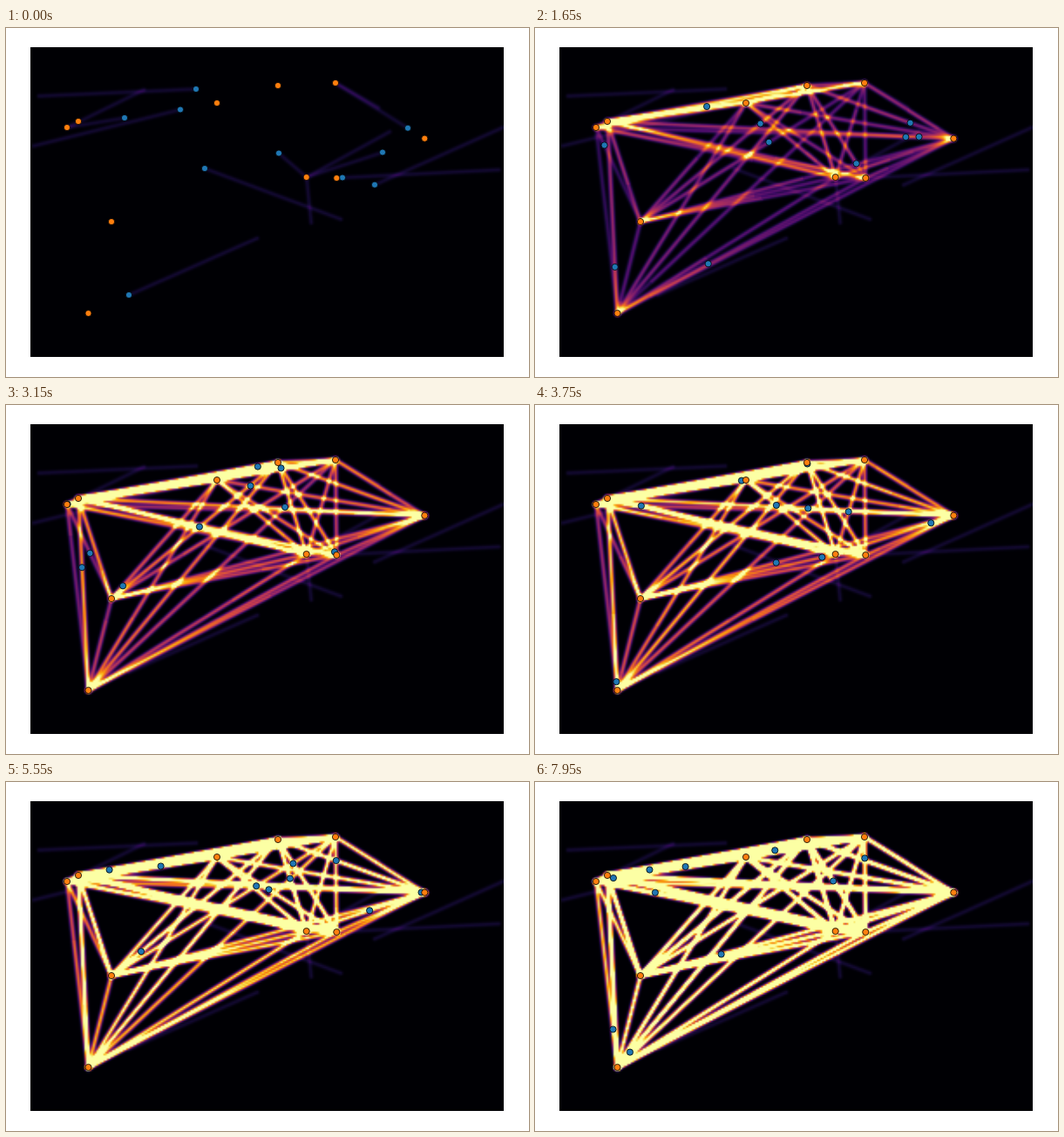
Recreate the animation shown at these times as an HTML page with a canvas. Size 600x400 px, loop 8000 ms.

```html
<!DOCTYPE html>
<html lang="en">
<head>
<meta charset="utf-8">
<title>Walkers between nodes</title>
<style>
  html, body { margin: 0; width: 100%; height: 100%; overflow: hidden; background: #fff; }
  canvas { display: block; }
</style>
</head>
<body>
<canvas id="stage" width="600" height="400"></canvas>
<script>
const STEP = 50, STEPS = 160, WALKERS = 10;
const BOX = { x: 28, y: 22, w: 543, h: 355 };
const COLS = 272, ROWS = 178;
const CW = BOX.w / COLS, CH = BOX.h / ROWS;
const SIGMA = 1.7, DEPOSIT = 0.085, RATE = 0.115;

// Each node has a place and a pull: how often walkers choose it
const nodes = [
  { at: [70, 114], pull: 0.75 }, { at: [83, 107], pull: 1.5 },
  { at: [242, 86], pull: 1.15 }, { at: [312, 66], pull: 1.35 },
  { at: [378, 63], pull: 1 }, { at: [480.3, 126.7], pull: 0.9 },
  { at: [344.7, 171], pull: 1 }, { at: [379.3, 172], pull: 0.9 },
  { at: [121, 222], pull: 0.9 }, { at: [94.5, 327], pull: 0.85 }
];

// First legs, from random places towards and past a node
const opening = [
  [[38, 78], [218, 70]], [[158, 71], nodes[0].at, [136, 103]], [[32, 135], [200, 93.5]],
  [[384, 219], [228, 161]], [[288, 241], [141, 306]], [[440, 119], nodes[6].at, [313, 143.5]],
  [[350, 223], nodes[6].at, [432, 142.5]], [[565, 162.5], [386, 171.5]],
  [[570, 114], [423, 179.7]], [[427, 91], nodes[4].at, [461, 114.7]]
];

const inferno = '000004 160b39 420a68 6a176e 932667 bc3754 dd513a f37819 fca50a f6d746 fcffa4'
  .split(' ').map(hex => [16, 8, 0].map(shift => parseInt(hex, 16) >> shift & 255));

const mix = (a, b, t) => a + (b - a) * t;
const rand = n => {
  n = Math.imul(n ^ (n >>> 15), 0x2c1b3c6d) + 0x9e3779b9 | 0;
  n = Math.imul(n ^ (n >>> 13), 0x297a2d39);
  return ((n ^ (n >>> 16)) >>> 0) / 4294967296;
};

// Cells near a segment: index, place along it and strength
function stroke([x1, y1], [x2, y2]) {
  const cells = [], pad = SIGMA * 3.5, dx = x2 - x1, dy = y2 - y1, len2 = dx * dx + dy * dy;
  const col = x => Math.floor((x - BOX.x) / CW), row = y => Math.floor((y - BOX.y) / CH);
  const c0 = Math.max(0, col(Math.min(x1, x2) - pad)), c1 = Math.min(COLS - 1, col(Math.max(x1, x2) + pad));
  const r0 = Math.max(0, row(Math.min(y1, y2) - pad)), r1 = Math.min(ROWS - 1, row(Math.max(y1, y2) + pad));
  for (let r = r0; r <= r1; r++) for (let c = c0; c <= c1; c++) {
    const px = BOX.x + (c + 0.5) * CW - x1, py = BOX.y + (r + 0.5) * CH - y1;
    const t = Math.max(0, Math.min(1, (px * dx + py * dy) / len2));
    const d = Math.hypot(px - t * dx, py - t * dy);
    if (d < pad) cells.push({ i: r * COLS + c, t, v: DEPOSIT * Math.exp(-d * d / (2 * SIGMA * SIGMA)) });
  }
  return cells;
}

const edges = [];
nodes.forEach((a, i) => nodes.slice(i + 1).forEach(b => edges.push({
  from: a.at, to: b.at, rate: RATE * a.pull * b.pull,
  phase: rand(edges.length + 7) - 0.5, cells: stroke(a.at, b.at)
})));

const base = new Float32Array(COLS * ROWS);
for (const path of opening)
  for (let j = 1; j < path.length; j++)
    for (const c of stroke(path[j - 1], path[j])) base[c.i] += c.v;

// Full crossings so far and the part of the current one; every other runs backwards
function progress(e, step) {
  const n = Math.max(0, e.rate * step + e.phase * Math.min(1, step / 8));
  const full = Math.floor(n);
  return { full, part: n - full, back: full % 2 === 1 };
}

// Walkers stand at the heads of randomly chosen current crossings
function walkers(step) {
  if (step === 0) return opening.map(path => path[path.length - 1]);
  const pool = edges.slice();
  return Array.from({ length: WALKERS }, (_, i) => {
    const [e] = pool.splice(Math.floor(rand(step * 31 + i * 977) * pool.length), 1);
    const { part, back } = progress(e, step), t = back ? 1 - part : part;
    return [mix(e.from[0], e.to[0], t), mix(e.from[1], e.to[1], t)];
  });
}

const ctx = document.getElementById('stage').getContext('2d');
const heat = document.createElement('canvas');
heat.width = COLS;
heat.height = ROWS;
const heatCtx = heat.getContext('2d');
const image = heatCtx.createImageData(COLS, ROWS);
const field = new Float32Array(COLS * ROWS);

function paintHeat(step) {
  field.set(base);
  for (const e of edges) {
    const { full, part, back } = progress(e, step);
    for (const c of e.cells) {
      const t = back ? 1 - c.t : c.t;
      field[c.i] += c.v * (full + (t < part ? 1 : 0));
    }
  }
  field.forEach((v, i) => {
    const p = Math.min(1, v) * 10, k = Math.min(9, Math.floor(p));
    for (let ch = 0; ch < 3; ch++) image.data[i * 4 + ch] = mix(inferno[k][ch], inferno[k + 1][ch], p - k);
    image.data[i * 4 + 3] = 255;
  });
  heatCtx.putImageData(image, 0, 0);
  ctx.drawImage(heat, BOX.x, BOX.y, BOX.w, BOX.h);
}

function dots(points, color) {
  ctx.fillStyle = color;
  ctx.strokeStyle = '#000';
  ctx.lineWidth = 0.8;
  for (const [x, y] of points) {
    ctx.beginPath();
    ctx.arc(x, y, 3.6, 0, Math.PI * 2);
    ctx.fill();
    ctx.stroke();
  }
}

function draw(step) {
  ctx.fillStyle = '#fff';
  ctx.fillRect(0, 0, 600, 400);
  paintHeat(step);
  dots(walkers(step), '#1f77b4');
  dots(nodes.map(n => n.at), '#ff7f0e');
}

const start = performance.now();
let shown = -1;
function tick() {
  const step = Math.floor((performance.now() - start) / STEP) % STEPS;
  if (step !== shown) draw(shown = step);
  requestAnimationFrame(tick);
}
tick();
</script>
</body>
</html>
```
